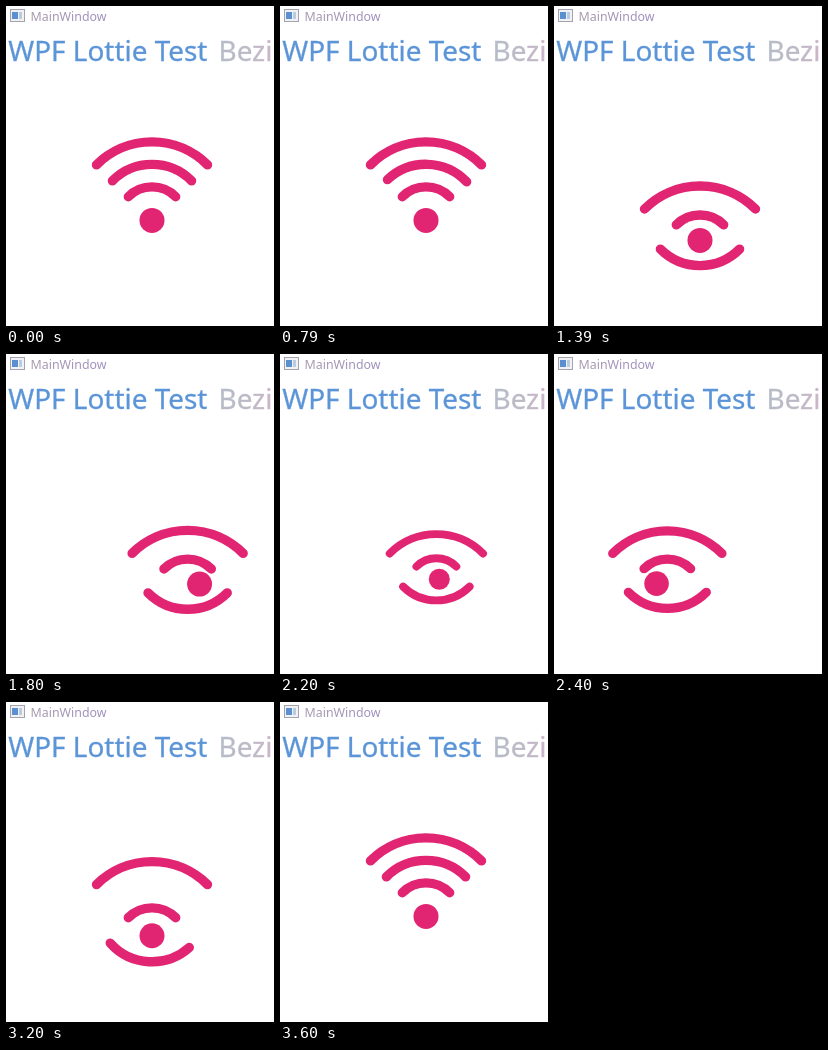
Animation, 268 px wide and 320 px high, one loop 4200 ms. Source, as an HTML page with a canvas:

```html
<!DOCTYPE html>
<html lang="en">
<head>
<meta charset="utf-8">
<title>MainWindow</title>
<style>
  html, body { margin: 0; width: 100%; height: 100%; overflow: hidden; background: #fff; }
  canvas, svg { position: absolute; left: 0; top: 0; width: 268px; height: 320px; }
  text { font-family: "Segoe UI", "Open Sans", "Noto Sans", sans-serif; white-space: pre; }
  .heading { font-size: 27.9px; stroke-width: .3px; }
</style>
</head>
<body>
<canvas id="stage" width="268" height="320"></canvas>
<svg viewBox="0 0 268 320">
  <defs>
    <linearGradient id="caption"><stop stop-color="#a79aae"/><stop offset="1" stop-color="#a090c0"/></linearGradient>
    <linearGradient id="tab" gradientUnits="userSpaceOnUse" x1="212" x2="268">
      <stop stop-color="#b5bcc8"/><stop offset=".6" stop-color="#bdb9c6"/><stop offset="1" stop-color="#cdb5cb"/>
    </linearGradient>
  </defs>
  <g shape-rendering="crispEdges">
    <rect x="4.5" y="3.5" width="14" height="12" fill="#f1f2f6" stroke="#a3a3b0"/>
    <rect x="6" y="6" width="6" height="7" fill="#5a90d0"/>
    <rect x="13" y="6" width="3" height="7" fill="#bccbe0"/>
  </g>
  <text x="24.5" y="15" font-size="12.4" fill="url(#caption)">MainWindow</text>
  <text class="heading" x="2.3" y="55" fill="#5b95d8" stroke="#5b95d8">WPF Lottie Test</text>
  <text class="heading" x="212.5" y="55" fill="url(#tab)" stroke="url(#tab)">Bezier</text>
</svg>
<script>
const ctx = document.getElementById('stage').getContext('2d');
const LOOP = 4200, FIRST = 790, LAST = 3600, STEP = (LAST - FIRST) / 42;
const PINK = '#e22573', CX = 146, BASE_Y = 214.4, PIVOT_Y = 204;

// Cubic bezier easing (.4, 0, .2, 1), solved by bisection.
function ease(x) {
  if (x <= 0) return 0;
  if (x >= 1) return 1;
  let lo = 0, hi = 1;
  for (let i = 0; i < 24; i++) {
    const s = (lo + hi) / 2, r = 1 - s;
    if (1.2 * s * r * r + 0.6 * s * s * r + s * s * s < x) lo = s; else hi = s;
  }
  return lo * lo * (3 - 2 * lo);
}

const progress = (t, start, duration) => ease((t - start) / duration);

// Parts open in order, each gap half the last, and close in reverse.
const opening = (t, order) => progress(t, 1160 - 400 / 2 ** order, 500 - 55 * order);
const closing = (t, order) => progress(t, 3160 - 10 * order ** 2, 455 - 25 * order);

function shiftedY(t, order, drop) {
  return BASE_Y + drop * (opening(t, order) - closing(t, order));
}

function arc(cy, ring, turn) {
  const mid = (turn - 0.5) * Math.PI;
  ctx.beginPath();
  ctx.arc(CX, cy, 11 + 22.5 * ring, mid - Math.PI / 4, mid + Math.PI / 4);
  ctx.stroke();
}

function draw(t) {
  const lookRight = progress(t, 1430, 400);
  const lookLeft = progress(t, 2062, 450);
  const lookBack = progress(t, 2715, 200);
  const gaze = lookRight - 2 * lookLeft + lookBack;
  const lift = 4.3 * (lookRight - lookBack);
  const scale = 1 - 0.16 * (progress(t, 2060, 140) - progress(t, 2215, 285));

  ctx.clearRect(0, 0, 268, 320);
  ctx.save();
  ctx.translate(CX + 35.8 * gaze, PIVOT_Y - lift);
  ctx.scale(scale, scale);
  ctx.translate(-CX, -PIVOT_Y);
  ctx.strokeStyle = ctx.fillStyle = PINK;
  ctx.lineWidth = 9.4;
  ctx.lineCap = 'round';
  arc(shiftedY(t, 0, -10.8), 2, opening(t, 0) + closing(t, 0));
  arc(shiftedY(t, 2, 28.5), 1, 0);
  arc(shiftedY(t, 3, 44.8), 3, 0);
  ctx.beginPath();
  ctx.arc(CX + 12 * gaze, shiftedY(t, 1, 20), 12.5, 0, Math.PI * 2);
  ctx.fill();
  ctx.restore();
}

// The motion advances in steps of about 67 ms.
function stepped(t) {
  if (t < FIRST - 5) return 0;
  if (t >= LAST - 5) return LOOP;
  return FIRST + Math.floor((t - FIRST) / STEP + 0.1) * STEP;
}

function frame() {
  draw(stepped(performance.now() % LOOP));
  requestAnimationFrame(frame);
}
frame();
</script>
</body>
</html>
```
